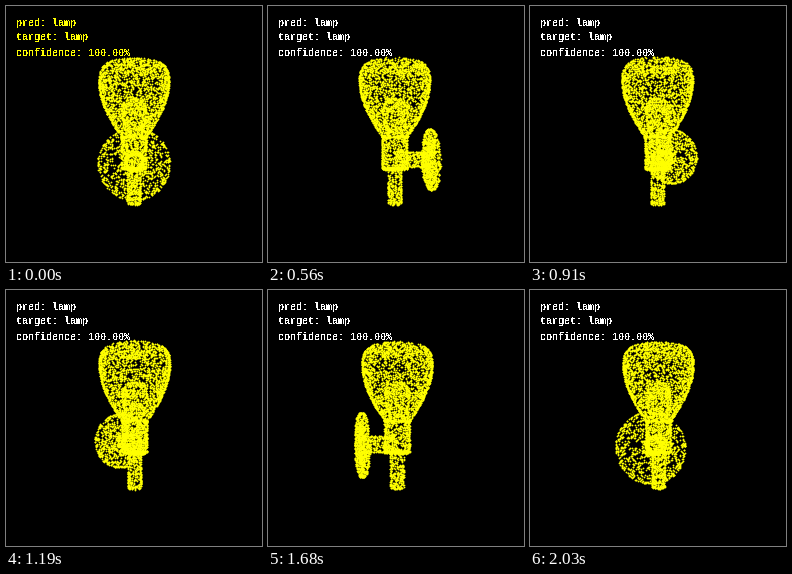
These frames come from a looping animation (256 px wide and 256 px high, 2.1 s). A matplotlib script:

```python
import numpy as np
import matplotlib.pyplot as plt
from matplotlib.animation import FuncAnimation

SIZE, FRAMES, LOOP = 256, 30, 2100
PX = 72 / 100       # one pixel in points
CENTER = 127.8      # vanishing point, px
EYE = 230           # camera distance, px
YELLOW = "#ffff00"

rng = np.random.default_rng(7)


def lathe(n, h0, h1, radius):
    """Points spread evenly over a surface turned around the height axis."""
    t = np.linspace(0, 1, 300)
    h, r = h0 + (h1 - h0) * t, radius(t)
    area = np.cumsum(r * np.hypot(np.gradient(h), np.gradient(r)))
    t = np.interp(rng.random(n) * area[-1], area, t)
    a = rng.random(n) * 2 * np.pi
    return np.array([radius(t) * np.cos(a), h0 + (h1 - h0) * t,
                     radius(t) * np.sin(a)])


def tube(n, h0, h1, r):
    return lathe(n, h0, h1, lambda t: r + 0 * t)


def disk(n, h, r):
    return lathe(n, h, h, lambda t: r * t)


def shade(t):
    rim = 1 - 0.12 * np.exp(-t / 0.05)
    return 35 * np.cos(1.507 * (t - 0.2)) * rim


def bulb(t):
    return 12.4 * np.sin(2.55 * np.sqrt(t))


def plate_rim(t):
    return 29.5 + np.sin(np.pi * t)


stem = np.hstack([
    lathe(1950, 67, -3, shade),
    disk(330, 67, 29.5),
    lathe(360, 36, -3, bulb),
    tube(430, -3, -34.5, 12.6),
    tube(90, -2, -4, 12.8),
    disk(130, -34.5, 12.8),
    tube(270, -34.5, -69.5, 6.6),
    disk(30, -69.5, 6.6),
])
arm = np.hstack([
    tube(110, 1, 7, 8.8),
    tube(210, 7, 33, 7.6),
    disk(370, 32.5, 29.5),
    disk(370, 37, 29.5),
    lathe(200, 32.5, 37, plate_rim),
])

# The stem stands just behind the turning axis; the arm points at the viewer.
x, y, z = np.hstack([stem + [[0], [0], [-1.3]],
                     arm[[0, 2, 1]] + [[0], [-25.5], [0]]])


def project(turn):
    c, s = np.cos(turn), np.sin(turn)
    scale = EYE / (EYE - (z * c - x * s))
    return CENTER + (x * c + z * s) * scale, CENTER - y * scale


fig = plt.figure(figsize=(SIZE / 100, SIZE / 100), dpi=100, facecolor="black")
ax = fig.add_axes([0, 0, 1, 1])
ax.set(xlim=(0, SIZE), ylim=(SIZE, 0))
ax.axis("off")

dots, = ax.plot([], [], "o", color=YELLOW, ms=1.8 * PX, mew=0)
labels = [
    ax.text(10, 19.5 + 15 * i, line, family="Liberation Mono", weight="bold",
            size=10 * PX, va="baseline", antialiased=False)
    for i, line in enumerate(["pred: lamp", "target: lamp", "confidence: 100.00%"])
]


def draw(i):
    dots.set_data(*project(2 * np.pi * i / FRAMES))
    for label in labels:
        label.set_color(YELLOW if i == 0 else "white")
    return [dots, *labels]


anim = FuncAnimation(fig, draw, frames=FRAMES, interval=LOOP / FRAMES,
                     repeat=True, repeat_delay=0, blit=False)
plt.show()
```
